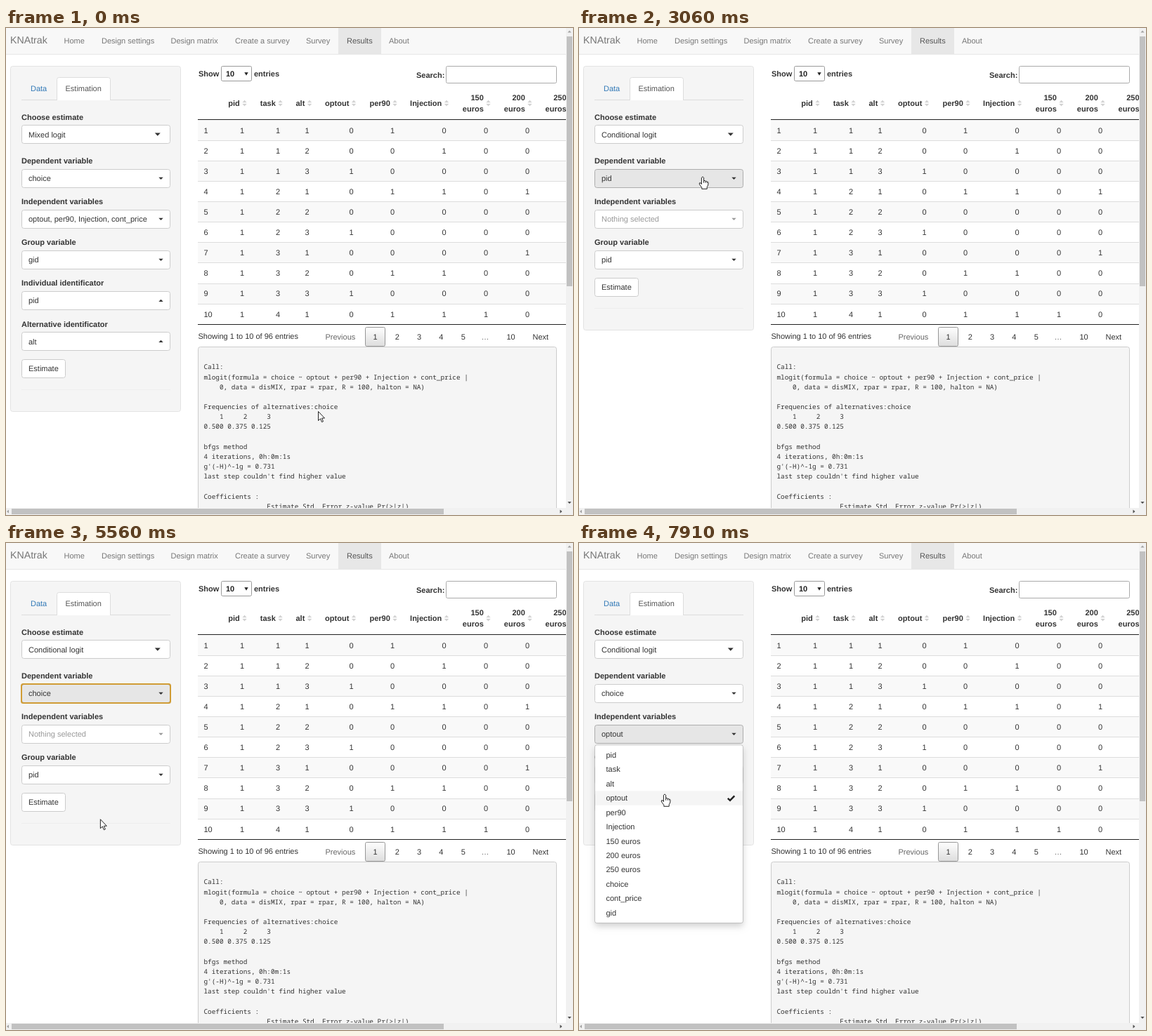
An HTML page with a canvas for the animation above (8 s loop, 807 by 694 pixels).

```html
<!DOCTYPE html>
<html lang="en">
<head>
<meta charset="utf-8">
<title>Survey results</title>
<style>
html, body { margin: 0; width: 100%; height: 100%; overflow: hidden; background: #fff; }
canvas { display: block; }
</style>
</head>
<body>
<canvas id="stage" width="807" height="694"></canvas>
<script>
const c = document.getElementById('stage').getContext('2d');
const LOOP = 8000, ROW = 20.45;
const SANS = '"Liberation Sans", Arial, sans-serif';
const REG = '11px ' + SANS, BOLD = 'bold ' + REG;
const MONO = '9.37px "Noto Sans Mono", "DejaVu Sans Mono", monospace';
c.textRendering = 'geometricPrecision';

// y is the middle of the capitals; baselines sit on whole pixels
function text(s, x, y, color = '#333', font = REG, align = 'left') {
  c.font = font;
  c.fillStyle = color;
  c.textAlign = align;
  c.fillText(s, x, Math.round(y + (font === MONO ? 3.2 : 3.6)));
}
function rect(x, y, w, h, color) {
  c.fillStyle = color;
  c.fillRect(x, y, w, h);
}
function box(x, y, w, h, r, fill, stroke, line = 1) {
  c.beginPath();
  c.roundRect(x, y, w, h, r);
  if (fill) { c.fillStyle = fill; c.fill(); }
  if (stroke) { c.strokeStyle = stroke; c.lineWidth = line; c.stroke(); }
}
function poly(points, fill, stroke, x = 0, y = 0) {
  c.beginPath();
  points.forEach(([px, py]) => c.lineTo(x + px, y + py));
  c.closePath();
  c.fillStyle = fill;
  c.fill();
  if (stroke) { c.strokeStyle = stroke; c.lineWidth = 1; c.stroke(); }
}
// triangle with half-width w; negative h points up
function caret(x, y, w, h, color = '#333') {
  poly([[-w, -h / 2], [w, -h / 2], [0, h / 2]], color, null, x, y);
}
function shadowed(draw) {
  c.save();
  c.shadowColor = 'rgba(0,0,0,.175)';
  c.shadowBlur = 9.4;
  c.shadowOffsetY = 4.7;
  draw();
  c.restore();
}

function navbar() {
  rect(0, 0, 797, 38, '#f8f8f8');
  rect(0, 37, 797, 1, '#e7e7e7');
  rect(473, 0, 61, 38, '#e7e7e7');
  text('KNAtrak', 6, 18.5, '#777', '14.2px ' + SANS);
  [['Home', 82.5], ['Design settings', 136], ['Design matrix', 234.5], ['Create a survey', 326],
    ['Survey', 427], ['Results', 485], ['About', 545]]
    .forEach(([s, x]) => text(s, x, 18, s === 'Results' ? '#555' : '#777'));
}

const DATA = ['11101000', '11200100', '11310000', '12101101', '12200000',
  '12310000', '13100001', '13201100', '13310000', '14101110'];
const COLS = [336, 387, 428.5, 491.5, 550, 623.5, 683, 742, 800.7];
const HEADS = ['pid', 'task', 'alt', 'optout', 'per90', 'Injection', '150', '200', '250'];

function table() {
  text('Show', 274, 65.5, '#333', BOLD);
  box(306.5, 54.5, 43, 21, 2, '#fff', '#999');
  text('10', 313, 65.5, '#222', BOLD);
  caret(342, 65.5, 2.7, 4.5, '#222');
  text('entries', 353, 65.5, '#333', BOLD);
  text('Search:', 584, 67, '#333', BOLD);
  box(626.5, 54.5, 157, 24, 2, '#fff', '#aaa');

  HEADS.forEach((s, i) => {
    const right = COLS[i] - 3.2;
    if (i < 6) text(s, right, 107, '#333', BOLD, 'right');
    else {
      text(s, right, 99.5, '#333', BOLD, 'right');
      text('euros', right, 115, '#333', BOLD, 'right');
    }
    caret(COLS[i] + 3.5, 104.5, 3.2, -3.6, '#d2d2d2');
    caret(COLS[i] + 3.5, 109.7, 3.2, 3.6, '#d2d2d2');
  });
  DATA.forEach((row, i) => {
    const y = 146 + i * 29.1, top = Math.floor(131.2 + i * 29.1);
    if (i % 2 === 0) rect(273, top, 524, 29, '#f9f9f9');
    if (i) rect(273, top, 524, 1, '#ddd');
    text(i + 1, 281.5, y);
    [...row].forEach((v, k) => text(v, COLS[k], y, '#333', REG, 'center'));
  });
  rect(273, 130, 524, 1, '#222');
  rect(273, 422, 524, 1, '#222');

  text('Showing 1 to 10 of 96 entries', 273.5, 439.5);
  text('Previous', 454.5, 440, '#666');
  const shade = c.createLinearGradient(0, 426, 0, 454);
  shade.addColorStop(0, '#fff');
  shade.addColorStop(1, '#dcdcdc');
  box(511.5, 426.5, 28, 27, 2, shade, '#979797');
  ['1', '2', '3', '4', '5', '…'].forEach((s, i) =>
    text(s, 525.5 + i * 31.3, 440, s === '…' ? '#666' : '#333', REG, 'center'));
  text('10', 718.5, 440, '#333', REG, 'center');
  text('Next', 749.5, 440);
}

const OUTPUT = `Call:
mlogit(formula = choice ~ optout + per90 + Injection + cont_price |
    0, data = disMIX, rpar = rpar, R = 100, halton = NA)

Frequencies of alternatives:choice
    1     2     3
0.500 0.375 0.125

bfgs method
4 iterations, 0h:0m:1s
g'(-H)^-1g = 0.731
last step couldn't find higher value

Coefficients :
                Estimate Std. Error z-value Pr(>|z|)`.split('\n');

function output() {
  box(273.5, 454.5, 510, 260, 3, '#f5f5f5', '#ccc');
  OUTPUT.forEach((s, i) => text(s, 281.5, 483.2 + i * 14.18, '#333', MONO));
}

function scrollbars() {
  rect(797, 0, 10, 694, '#f1f1f1');
  rect(0, 684, 807, 10, '#f1f1f1');
  rect(798, 12, 8, 356, '#c1c1c1');
  rect(8, 685, 615, 8, '#c1c1c1');
  caret(802, 5, 2.6, -3, '#a3a3a3');
  caret(802, 676.5, 2.6, 3, '#505050');
  poly([[788.5, 686.5], [788.5, 691.5], [791.5, 689]], '#505050');
  poly([[4, 686.5], [4, 691.5], [1, 689]], '#a3a3a3');
}

const MODELS = ['FALSE', 'Conditional logit', 'Mixed logit', 'Willingness to pay', 'Figures'];
const VARS = ['pid', 'task', 'alt', 'optout', 'per90', 'Injection', '150 euros', '200 euros',
  '250 euros', 'choice', 'cont_price', 'gid'];
const FIELD_Y = [152, 214, 272.3, 330.5, 388.7, 446.9];
const LABELS = ['Choose estimate', 'Dependent variable', 'Independent variables',
  'Group variable', 'Individual identificator', 'Alternative identificator'];

// look: '', 'hover', 'focus' or 'pressed'
function field(i, value, look, up) {
  const y = FIELD_Y[i], top = Math.floor(y - 13) + .5;
  const color = value === 'Nothing selected' ? '#999' : '#333';
  text(LABELS[i], 22, y - 25, '#333', BOLD);
  const fill = { hover: '#e6e6e6', focus: '#e6e6e6', pressed: '#d4d4d4' }[look] || '#fff';
  box(22.5, top, 211, 26, 3, fill, look ? '#adadad' : '#ccc');
  if (look === 'pressed') {
    const g = c.createLinearGradient(0, top, 0, top + 5);
    g.addColorStop(0, 'rgba(0,0,0,.12)');
    g.addColorStop(1, 'rgba(0,0,0,0)');
    rect(23, top, 210, 5, g);
  }
  if (look === 'pressed' || look === 'focus') box(22, top - .5, 212, 27, 2.5, null, '#d09c35', 2);
  text(value, 32, y, color);
  caret(220.5, top + 12.9, 3.2, up ? -3.4 : 3.4, color);
}

function modelField(value, focused, open) {
  text(LABELS[0], 22, 127, '#333', BOLD);
  c.save();
  if (focused) { c.shadowColor = 'rgba(102,175,233,.6)'; c.shadowBlur = 6; }
  box(22.5, 138.5, 211, 26, 3, '#fff', focused ? '#66afe9' : '#ccc');
  c.restore();
  text(value, 32, 152);
  caret(215.8, open ? 151 : 151.6, 4, open ? -4.2 : 4.2);
}

function menu(top, items, x, hover, picked, checked) {
  const h = items.length * ROW + 8.4;
  shadowed(() => box(22.5, top, 211, h, 3, '#fff'));
  box(22.5, top, 211, h, 3, null, 'rgba(0,0,0,.2)');
  items.forEach((s, i) => {
    const y = top + 4.2 + i * ROW;
    if (i === picked) rect(23, y, 210, ROW, '#337ab7');
    else if (i === hover) rect(23, y, 210, ROW, '#f5f5f5');
    text(s, x, y + ROW / 2, i === picked ? '#fff' : '#333');
    if (i === checked) {
      c.beginPath();
      c.moveTo(211.8, y + 10.5);
      c.lineTo(215, y + 13.5);
      c.lineTo(221.3, y + 7);
      c.strokeStyle = '#222';
      c.lineWidth = 2.5;
      c.stroke();
    }
  });
}

// time, x, y, eased on arrival
const PATH = [[0, 444, 546], [300, 444, 546], [1100, 206, 160, 1], [1570, 206, 160],
  [1860, 181.5, 200.5, 1], [2830, 181.5, 200.5], [3060, 176, 211.5, 1], [3670, 176, 211.5],
  [3970, 162, 261.5], [4450, 143, 376], [4480, 143, 376], [4810, 133, 429.5, 1], [5350, 133, 429.5],
  [6010, 136.5, 279.2, 1], [6270, 136.5, 279.2], [7070, 122, 357, 1], [7100, 122, 357.5], [LOOP, 122, 357.5]];

function pointer(t) {
  const k = Math.max(1, PATH.findIndex(p => p[0] > t));
  const [t0, x0, y0] = PATH[k - 1], [t1, x1, y1, eased] = PATH[k];
  let u = (t - t0) / (t1 - t0);
  if (eased) u = u * u * (3 - 2 * u);
  return [x0 + (x1 - x0) * u, y0 + (y1 - y0) * u];
}

const ARROW = [[0, 0], [0, 13], [3, 10.2], [5, 15], [7, 14.2], [5, 9.5], [9, 9.5]];
function arrow(x, y) { poly(ARROW, '#fff', '#222', x + .5, y + .5); }

function hand(x, y) {
  c.save();
  c.translate(x, y);
  c.beginPath();
  c.moveTo(-1.6, 11);
  c.lineTo(-1.6, 1.8);
  c.quadraticCurveTo(0, -1, 1.6, 1.8);
  c.lineTo(1.6, 6.2);
  c.quadraticCurveTo(3.2, 5.2, 4.2, 7);
  c.quadraticCurveTo(5.6, 6, 6.4, 7.8);
  c.quadraticCurveTo(8, 7.2, 8, 9.2);
  c.quadraticCurveTo(8.2, 13, 6.2, 15.2);
  c.lineTo(6.2, 17.8);
  c.lineTo(-1.2, 17.8);
  c.lineTo(-1.2, 15.8);
  c.quadraticCurveTo(-3.4, 13.4, -4.8, 10.6);
  c.quadraticCurveTo(-4.8, 8.4, -2.8, 9.4);
  c.closePath();
  c.fillStyle = '#fff';
  c.fill();
  [1.6, 4.2, 6.4].forEach((kx, i) => {
    c.moveTo(kx, 6.2 + i * .8);
    c.lineTo(kx, 9.2);
  });
  c.strokeStyle = '#222';
  c.lineWidth = 1;
  c.stroke();
  c.restore();
}

const CLICKS = [[1130, 1370], [2170, 2270], [3160, 3280], [4990, 5090], [6010, 6140], [7840, 7910]];
const within = (t, a, b) => t >= a && t < b;

function sidebar(t, x, y) {
  const mixed = t < 2220;
  const modelOpen = within(t, 1200, 2220), depOpen = within(t, 3230, 5060), indOpen = t >= 6140;
  const open = modelOpen || depOpen || indOpen;
  const chosen = t >= 7910;
  const inX = x > 22 && x < 234;
  const over = i => !open && inX && Math.abs(y - FIELD_Y[i]) < 13.2;

  box(6.5, 54.5, 242, mixed ? 492 : 376, 3, '#f5f5f5', '#e3e3e3');
  rect(22, 102, 212, 1, '#ddd');
  box(72.5, 70.5, 76, 36, [3, 3, 0, 0], '#fff', '#ddd');
  rect(70, 103, 81, 5, '#f5f5f5');
  rect(73, 102, 75, 1, '#fff');
  text('Data', 35, 86.5, '#337ab7');
  text('Estimation', 84.5, 86.5, '#555');

  modelField(mixed ? 'Mixed logit' : 'Conditional logit', within(t, 1130, 2220), modelOpen);

  let dep = over(1) ? 'hover' : '', ind = over(2) ? 'hover' : '';
  if (within(t, 3160, 5060)) dep = 'pressed';
  else if (within(t, 5060, 6010)) dep = 'focus';
  if (chosen) ind = 'hover';
  else if (t >= 6010) ind = 'pressed';
  field(1, mixed || t >= 5060 ? 'choice' : 'pid', dep);
  field(2, mixed ? 'optout, per90, Injection, cont_price' : chosen ? 'optout' : 'Nothing selected', ind);
  field(3, mixed ? 'gid' : 'pid', over(3) ? 'hover' : '');
  if (mixed) {
    field(4, 'pid', '', true);
    field(5, 'alt', '', true);
  }
  const by = mixed ? 472.5 : 356.5;
  box(22.5, by, 62, 26, 3, '#fff', '#ccc');
  text('Estimate', 32, by + 13);
  rect(22, by + 42.5, 212, 1, '#eee');

  const hovered = top => Math.floor((y - top - 4.2) / ROW);
  if (modelOpen) menu(167.3, MODELS, 32, y > 171 ? hovered(167.3) : 2);
  if (depOpen) menu(229.6, VARS, 38.5, hovered(229.6), 0);
  if (indOpen) menu(287.8, VARS, 38.5, hovered(287.8), -1, chosen ? 3 : -1);
  return open || [0, 1, 2, 3].some(over);
}

function draw(t) {
  rect(0, 0, 807, 694, '#fff');
  const [x, y] = pointer(t);
  navbar();
  table();
  output();
  scrollbars();
  const clickable = sidebar(t, x, y);
  if (CLICKS.some(([a, b]) => within(t, a, b))) {
    c.beginPath();
    c.arc(x - .3, y + .3, 9.3, 0, 7);
    c.fillStyle = 'rgba(240,228,40,.68)';
    c.fill();
  }
  (clickable ? hand : arrow)(x, y);
}

const start = performance.now();
function tick() {
  draw((performance.now() - start) % LOOP);
  requestAnimationFrame(tick);
}
tick();
</script>
</body>
</html>
```
